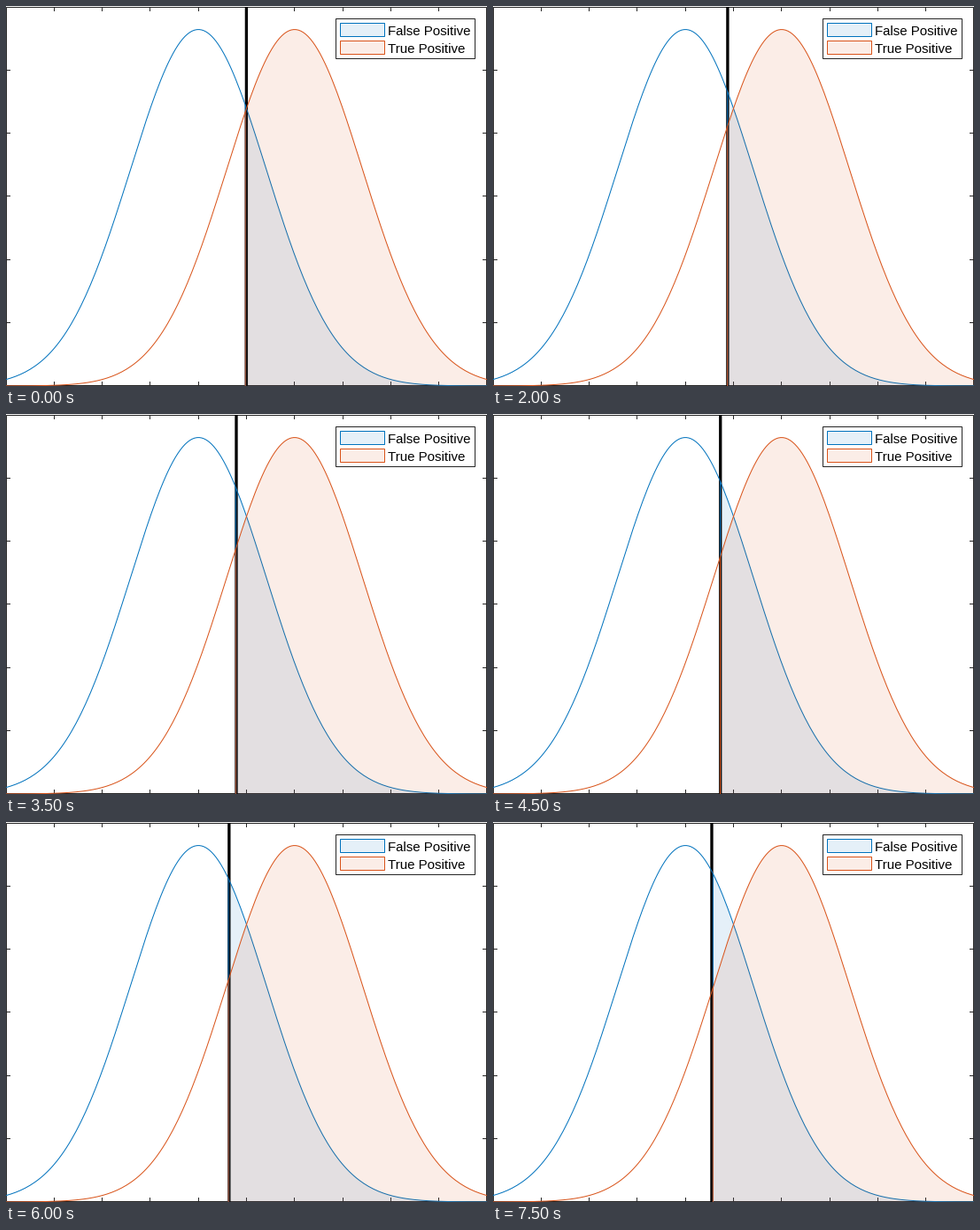
Recreate the animation shown at these times as a matplotlib script. Size 543x429 px, loop 8 s.

```python
import numpy as np
import matplotlib.pyplot as plt
from matplotlib.animation import FuncAnimation
from matplotlib.patches import Polygon, Rectangle

W, H, DPI = 543, 429, 64
FRAMES, INTERVAL = 16, 500
PX = 72 / DPI  # points per pixel

BLUE, RED, DARK = "#0072BD", "#D95319", "#262626"
TOP, BASE = 1, H
TICK = 5
STEP = 0.03  # threshold shift per frame

plt.rcParams["font.family"] = "Liberation Sans"
plt.rcParams["path.snap"] = False
fig = plt.figure(figsize=(W / DPI, H / DPI), dpi=DPI, facecolor="white")
ax = fig.add_axes([0, 0, 1, 1])
ax.set_xlim(0, W)
ax.set_ylim(H, 0)
ax.axis("off")


def px(u):
    return (u + 5) / 10 * W


def py(v):
    return BASE - v / 0.3 * (BASE - TOP)


def center(p):
    return np.floor(p) + 0.5


def density(u, mean):
    return np.exp(-(u - mean) ** 2 / 4) / np.sqrt(4 * np.pi)


def line(xs, ys, color=DARK, width=1.0, z=1):
    return ax.plot(xs, ys, color=color, lw=width * PX, zorder=z,
                   solid_capstyle="butt")[0]


def box(x, y, w, h, z, **kw):
    ax.add_patch(Rectangle((x, y), w, h, zorder=z, **kw))


# Axes box and inward ticks
box(0.5, TOP + 0.5, W - 1, BASE - TOP - 1, 2.5, fill=False, ec=DARK, lw=PX)
for u in range(-4, 5):
    x = center(px(u))
    line([x, x], [BASE, BASE - TICK])
    line([x, x], [TOP, TOP + TICK])
for v in np.arange(1, 6) * 0.05:
    y = center(py(v))
    line([0, TICK], [y, y])
    line([W - TICK, W], [y, y])

grid = np.linspace(-5, 5, 200)
threshold = line([0, 0], [TOP, BASE], "black", 3.33, 2.6)


class Curve:
    def __init__(self, mean, color, z):
        self.ys = py(density(grid, mean))
        self.area = Polygon([(0, 0), (1, 0), (1, 1)], fc=color, alpha=0.1,
                            lw=0, zorder=z)
        ax.add_patch(self.area)
        self.edge = line([0, 0], [0, 1], color, z=z + 0.2)
        line(px(grid), self.ys, color, z=z + 0.4)

    def cut(self, i):
        xs, ys = px(grid[i:]), self.ys[i:]
        self.area.set_xy(np.column_stack([
            np.r_[xs[0], xs, xs[-1]], np.r_[BASE, ys, BASE]]))
        self.edge.set_data([xs[0], xs[0]], [BASE, ys[0]])


curves = [Curve(-1, BLUE, 3), Curve(1, RED, 4)]

# Legend
box(372.5, 14.5, 157, 45, 10, fc="white", ec=DARK, lw=PX)
for label, color, y in (("False Positive", BLUE, 19.5),
                        ("True Positive", RED, 39.5)):
    box(377.5, y, 50, 15, 11, fc=color, alpha=0.1, lw=0)
    box(377.5, y, 50, 15, 12, fill=False, ec=color, lw=PX)
    ax.text(431, y + 13.5, label, size=15 * PX, color="black",
            va="baseline", zorder=12)


def update(k):
    t = -STEP * k
    x = px(t) - 0.1
    threshold.set_xdata([x, x])
    # The shaded areas start at the sample closest to the threshold
    nearest = int(np.argmin(np.abs(grid - t + 1e-9)))
    for c in curves:
        c.cut(nearest)
    return []


anim = FuncAnimation(fig, update, frames=FRAMES, interval=INTERVAL,
                     init_func=lambda: update(0), repeat=True,
                     repeat_delay=0, blit=False)
plt.show()
```
